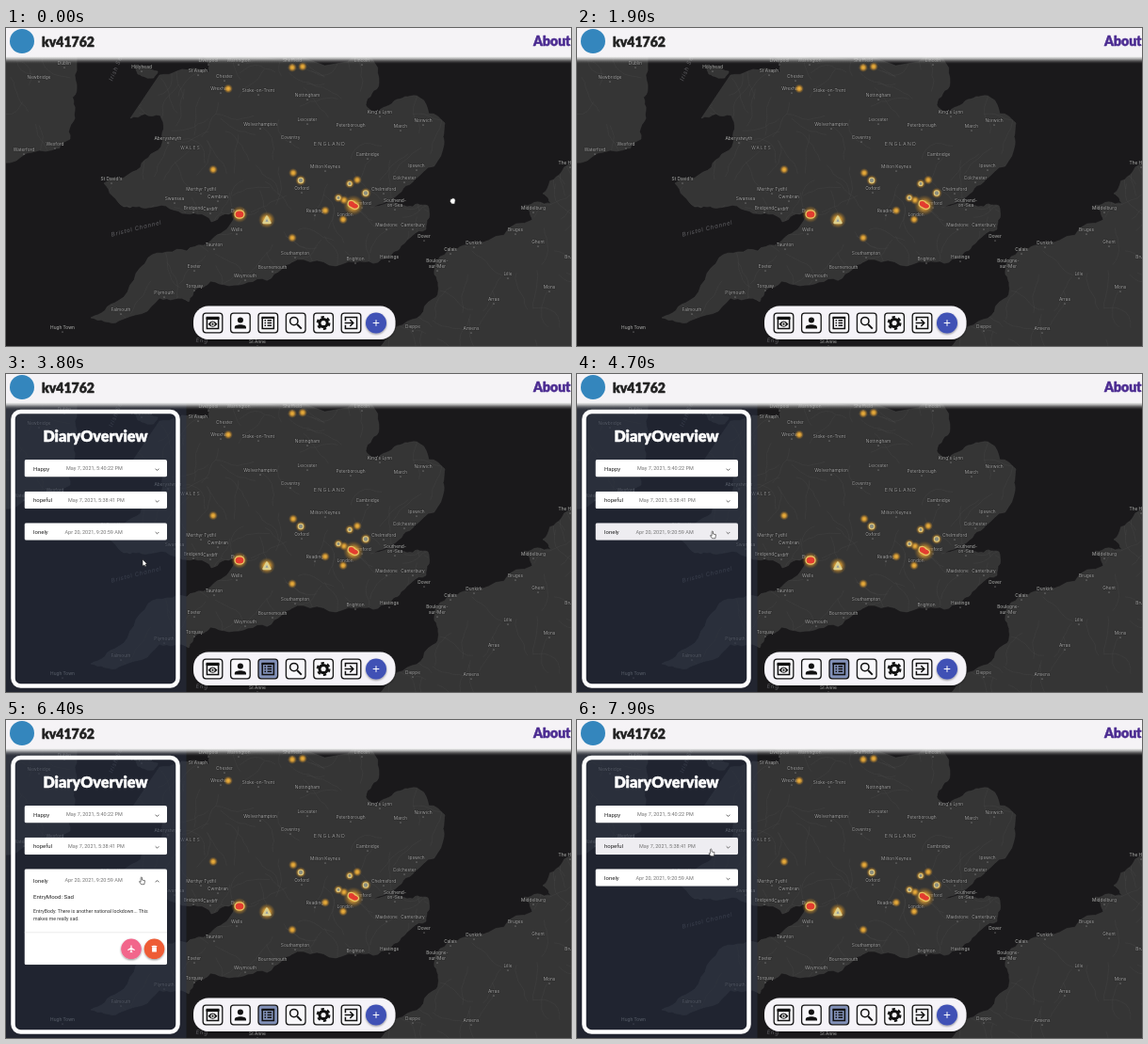
These frames come from a looping animation (600 by 338 pixels, 8 s). An HTML page:

```html
<!DOCTYPE html>
<html lang="en">
<head>
<meta charset="utf-8">
<title>Mood map</title>
<style>
html, body { margin: 0; width: 100%; height: 100%; overflow: hidden; background: #1a191b; }
#stage { display: block; width: 100vw; height: 100vh; }
text { font-family: Roboto, Arial, sans-serif; }
.round { font-family: Lato, "Open Sans", sans-serif; font-weight: 900; stroke-width: .5; stroke-linejoin: round; }
#labels text { font-family: Inter, Roboto, sans-serif; font-size: 4.8px; fill: #a9a9a9; text-anchor: middle; paint-order: stroke; stroke: #222; stroke-width: .7; }
#labels .region { font-size: 5.4px; letter-spacing: 1.2px; fill: #999; }
#labels .water { font-size: 6.2px; letter-spacing: .7px; fill: #606064; font-style: italic; stroke: none; }
.icon { fill: none; stroke: #111; stroke-width: 2; }
.icon .solid { fill: #111; stroke: none; }
</style>
</head>
<body>
<svg id="stage" viewBox="0 0 600 338" preserveAspectRatio="none">
  <defs>
    <radialGradient id="warm">
      <stop offset="0" stop-color="#f5b93d"/>
      <stop offset=".4" stop-color="#d99c34" stop-opacity=".9"/>
      <stop offset="1" stop-color="#8d6424" stop-opacity="0"/>
    </radialGradient>
    <linearGradient id="fade" x2="0" y2="1">
      <stop offset="0" stop-color="#fff"/>
      <stop offset=".35" stop-color="#ddd" stop-opacity=".75"/>
      <stop offset="1" stop-color="#555" stop-opacity="0"/>
    </linearGradient>
    <filter id="shadow" x="-30%" y="-30%" width="160%" height="180%">
      <feDropShadow dx="0" dy="1" stdDeviation="1" flood-opacity=".45"/>
    </filter>
    <path id="land"/>
    <clipPath id="coast"><use href="#land"/></clipPath>
  </defs>

  <use href="#land" fill="#353535" stroke="#404040" stroke-width=".5"/>
  <g clip-path="url(#coast)"><path id="roads" fill="none" stroke="#545454" stroke-width=".4" opacity=".5"/></g>
  <g id="labels"></g>
  <g id="heat"></g>

  <g id="panel">
    <path d="M0 30H191.5V338H0Z" fill="#2a3248" fill-opacity=".48"/>
    <rect x="7.5" y="40" width="175" height="291.5" rx="8" fill="#1b2132" fill-opacity=".25" stroke="#fff" stroke-width="4.5"/>
    <text class="round" x="95" y="72" font-size="16.2" text-anchor="middle" fill="#fff" stroke="#fff">DiaryOverview</text>
    <g id="rows"></g>
  </g>

  <rect y="30" width="600" height="8" fill="url(#fade)"/>
  <rect width="600" height="30" fill="#f5f3f6"/>
  <circle cx="17" cy="14" r="13" fill="#3486bd"/>
  <text class="round" x="38" y="19.5" font-size="14" fill="#222" stroke="#222">kv41762</text>
  <text class="round" x="560" y="18.5" font-size="14" fill="#4b2b91" stroke="#4b2b91">About</text>

  <rect x="199" y="295.5" width="214.5" height="35.5" rx="16" fill="#f5f3f8" filter="url(#shadow)"/>
  <g id="tools"></g>
  <circle cx="393" cy="313.5" r="11" fill="#3f51b5" filter="url(#shadow)"/>
  <path d="M389.7 313.5h6.6m-3.3-3.3v6.6" stroke="#fff"/>

  <g id="cursor" stroke="#222" stroke-width=".6" stroke-linejoin="round" fill="#fff">
    <path id="arrow" d="M-2-4V3L0 2 1 4 2 3 1 1H3Z"/>
    <path id="hand" d="M-1.4-3.5Q-.7-4.4 0-3.5V-1L3-.3 2.4 3.7H-1L-3 .7-1.4 .9Z"/>
    <path id="palm" d="M-2.5-2L-1-2.5 .3-3.2 2-2.5 2.7-1 2 3H-1.2L-3 .5Z"/>
  </g>
</svg>
<script>
const $ = id => document.getElementById(id);
const put = (id, markup) => $(id).insertAdjacentHTML('beforeend', markup);
const LOOP = 8000;
let seed = 17;
const rnd = () => (seed = seed * 16807 % 2147483647) / 2147483647;

// Roughens the line between two points by midpoint displacement
function rough([ax, ay], [bx, by], depth) {
  if (!depth) return `L${bx.toFixed(1)} ${by.toFixed(1)}`;
  const k = (rnd() - .5) * .3;
  const mid = [(ax + bx) / 2 + (ay - by) * k, (ay + by) / 2 + (bx - ax) * k];
  return rough([ax, ay], mid, depth - 1) + rough(mid, [bx, by], depth - 1);
}
let coast = '';
function addCoast(text) {
  const pts = text.trim().split(/\s+/).map(p => p.split(',').map(Number));
  coast += 'M' + pts[0] + pts.slice(1).map((p, i) => rough(pts[i], p, 3)).join('') + 'Z';
}
addCoast('-9,20 76,20 75,60 73,88 68,118 42,131 -9,145');
addCoast('136,39 161,46 157,53 140,49');
addCoast(`163,50 202,43 216,47 203,20 381,20 396,58 382,82 393,92 415,76 439,74 466,101
  465,124 434,161 411,181 387,191 426,190 448,189 446,214 420,231 408,244 371,249 316,246
  293,256 257,270 217,269 201,278 194,291 163,287 120,311 90,308 119,290 151,244 192,237
  224,220 243,196 218,206 187,197 151,191 125,190 104,165 143,148 166,122 164,93 132,96`);
addCoast(`392,345 426,312 457,286 455,262 461,243 496,230 559,204 550,188 579,187 570,176 590,153 608,140 608,345`);
$('land').setAttribute('d', coast);

// Faint road network
let roads = '';
for (let i = 0; i < 230; i++) {
  let x = rnd() * 600, y = 30 + rnd() * 308, a = rnd() * 6.28;
  roads += `M${x} ${y}`;
  for (let k = 0; k < 7; k++) {
    a += rnd() - .5;
    x += 6 * Math.cos(a);
    y += 6 * Math.sin(a);
    roads += `L${x.toFixed(1)} ${y.toFixed(1)}`;
  }
}
$('roads').setAttribute('d', roads);

function towns(text) {
  for (const item of text.split('|')) {
    const [, name, x, y] = item.trim().match(/^(.+) (\d+) (\d+)$/);
    put('labels', `<text x="${x}" y="${+y + 1.8}">${name}</text>
      <circle cx="${x}" cy="${+y + 5}" r=".6" fill="#aaa"/>`);
  }
}
const tilt = (text, x, y, turn) =>
  put('labels', `<text class="water" transform="translate(${x} ${y}) rotate(${turn})">${text}</text>`);
const region = (text, x, y, size) =>
  put('labels', `<text class="region" x="${x}" y="${y}" style="font-size:${size}px">${text}</text>`);

towns(`Dublin 62 37|Newbridge 35 52|Liverpool 215 34|Warrington 247 34|Sheffield 304 34|St Asaph 204 45
|Chester 232 51|Wrexham 228 64|Stoke-on-Trent 268 66|Nottingham 320 71|Holyhead 144 41|Lincoln 378 34|King's Lynn 397 89
|Norwich 443 98|March 419 104|Leicester 320 97|Peterborough 366 103|Wolverhampton 270 102|Coventry 302 116
|Cambridge 384 134|Aberystwyth 172 117|Waterford 19 129|Wexford 52 123|St David's 112 160|Milton Keynes 339 147`);
region('ENGLAND', 344, 125, 5.4);
region('WALES', 196, 129, 4.6);
towns(`Ipswich 436 146|Colchester 423 159|Merthyr Tydfil 207 171|Swansea 179 181|Cwmbran 225 179|Bridgend 199 191
|Cardiff 217 192|Bristol 246 194|Wells 245 214|Taunton 221 230|Oxford 314 170|Reading 328 194|London 360 198
|Chelmsford 401 171|Southend- 413 183|on-Sea 413 188|Romford 378 186|Maidstone 404 209|Canterbury 432 209|Dover 444 221
|Hastings 407 243|Brighton 371 245|Southampton 307 239`);
tilt('Bristol Channel', 139, 215, -14);
tilt('Irish Sea', 119, 42, -68);
tilt('Eng', 208, 334, 5);
towns(`Bournemouth 283 254|Exeter 200 253|Torquay 200 274|Weymouth 254 263|Plymouth 168 281|Falmouth 122 299|Hugh Town 60 318
|Calais 472 235|Dunkirk 497 228|Boulogne- 458 247|sur-Mer 458 253|Bruges 541 214|Ghent 565 227|Middelburg 560 191
|The Hague 599 143|Brussels 603 243|Lille 533 261|Mons 577 275|Arras 518 288|Amiens 494 319|Dieppe 432 317|St Anne 267 333`);

// Heat spots: soft dots, rings, hot cores
const dot = (x, y, r = 5) => `<circle cx="${x}" cy="${y}" r="${r}" fill="url(#warm)"/>`;
const ring = (x, y, r = 2.7) => dot(x, y, r + 3.2) +
  `<circle cx="${x}" cy="${y}" r="${r}" fill="#8c8f80" stroke="#dfc679" stroke-width="1.1"/>`;
const spots = [[304, 42], [315, 41], [236, 64.5], [220, 150.5], [305, 154], [373, 161.5], [359, 183], [339, 194], [358, 203.5], [304, 223]];
put('heat', spots.map(p => dot(...p)).join('') + ring(313, 162) + ring(365, 165.5, 2) + ring(382, 175.5) + ring(353, 180.5, 2) +
  dot(277, 204, 9) + `<path d="M277 200.5l3.5 6.5h-7z" fill="#8f9ba8" stroke="#ddd08e" stroke-width="2.4" stroke-linejoin="round"/>` +
  dot(248, 198, 9) + dot(369, 188.5, 11) +
  `<g fill="#e33c2f" stroke="#e8c765" stroke-width="1.3"><ellipse cx="248" cy="198" rx="5" ry="4.2"/>
   <path d="M364 184Q368 182 371 186 376 188 374 191 371 194 367 191 361 189 364 184Z"/></g>`);

// Toolbar
const sheet = '<path d="M4 4h16v16H4z"/><path d="M3 5h18"/>';
const icons = [
  sheet + '<path d="M3 6h18" stroke-width="3"/><path class="solid" d="M5.5 13.5q6.5-8 13 0-6.5 8-13 0"/><circle cx="12" cy="13.5" r="2.2" fill="#111" stroke="#fff" stroke-width="1.4"/>',
  '<circle class="solid" cx="12" cy="8" r="4"/><path class="solid" d="M4 20v-2c0-5 16-5 16 0v2z"/>',
  sheet + '<path d="M7 8.5h10m-10 3.5h10m-10 3.5h10" stroke-dasharray="2 2 6 0"/>',
  '<circle cx="9.5" cy="9.5" r="5.5"/><path d="M14 14l6 6" stroke-width="2.6"/>',
  '<circle cx="12" cy="12" r="5.4" stroke-width="4"/><circle cx="12" cy="12" r="8.2" stroke-width="3.2" stroke-dasharray="4.29"/>',
  '<path d="M4 9V4h16v16H4v-5M3 12h12M10.500 7.500l4.500 4.500-4.500 4.500"/>'
];
icons.forEach((art, i) => {
  const x = 219.5 + 29.4 * i, y = 313.5;
  put('tools', `<rect id="tool${i}" x="${x - 10.3}" y="${y - 10.3}" width="20.6" height="20.6" rx="3" fill="#f8f7fa" stroke="#151515" stroke-width="1.3"/>
    <g class="icon" transform="translate(${x} ${y}) scale(.76) translate(-12 -12)">${art}</g>`);
});

// Timeline rows
const button = (x, color, d) => `<circle cx="${x}" cy="85" r="10.8" fill="${color}" filter="url(#shadow)"/>
  <path transform="translate(${x} 85) scale(.4)" d="${d}" fill="#fff"/>`;
const plane = 'M-1.500-8q1.500-4 3 0v5l8 5v2l-8-2.500v5.500l2 1.500v1.500l-3.500-1-3.500 1v-1.500l2-1.500v-5.500l-8 2.500v-2l8-5z';
const bin = 'M-6-5h12v13h-12zM-7-8h3l1-1h6l1 1h3v2h-14z';
const details = `<g id="details">
  <text x="9.5" y="31.8" font-size="6.1" fill="#222">EntryMood: Sad</text>
  <g font-size="5.2" fill="#333"><text x="9.5" y="46.5">EntryBody: There is another national lockdown... This</text>
  <text x="9.5" y="54.5">makes me really sad.</text></g>
  <path d="M0 67.5h152" stroke="#e2e2e2" stroke-width=".7"/>
  ${button(113.5, '#f2668b', plane)}${button(138, '#ee5b36', bin)}</g>`;
[['Happy', 'May 7, 2021, 5:40:22 PM', 44.5], ['hopeful', 'May 7, 2021, 5:38:41 PM', 46.5],
 ['lonely', 'Apr 20, 2021, 9:20:59 AM', 43]].forEach(([mood, date, dx], i) => {
  put('rows', `<svg id="row${i}" x="19.5" y="${91 + 33.65 * i}" width="151.5" height="18.5" overflow="hidden">
    <rect id="face${i}" width="151.5" height="100%" rx="2" fill="#fff"/>
    <g id="head${i}"><text x="9.5" y="11.5" font-size="6" fill="#222">${mood}</text>
    <text x="${dx}" y="11.4" font-size="5.5" fill="#747474">${date}</text>
    <path id="chevron${i}" d="M-1.8-.8L0 1 1.8-.8" transform="translate(141 10.5)" fill="none" stroke="#555" stroke-width=".9"/></g>
    ${i === 2 ? details : ''}</svg>`);
});

const ease = (t, from, to) => {
  const p = Math.min(1, Math.max(0, (t - from) / (to - from)));
  return p * p * (3 - 2 * p);
};
// Cursor moves: start, end, x, y
const moves = [[400, 1600, 277, 316], [2700, 3600, 147, 201], [3950, 4500, 144.5, 171], [7150, 7600, 143, 141]];
const set = (id, key, value) => $(id).setAttribute(key, value);

function frame() {
  const t = performance.now() % LOOP;
  let x = 474.5, y = 184;
  for (const [from, to, mx, my] of moves) {
    const p = ease(t, from, to);
    x += (mx - x) * p;
    y += (my - y) * p;
  }
  set('cursor', 'transform', `translate(${x} ${y})`);

  const open = ease(t, 1950, 2150);
  set('panel', 'transform', `translate(${-192 * (1 - open)} 0)`);
  set('tool2', 'fill', t > 2000 ? '#8291b8' : '#f8f7fa');

  const grow = ease(t, 5000, 5300) - ease(t, 6750, 7050);
  set('row2', 'height', 18.5 + 83.5 * grow);
  set('head2', 'transform', `translate(0 ${2.7 * grow})`);
  set('chevron2', 'transform', `translate(141 10.5) rotate(${180 * grow})`);
  set('details', 'opacity', grow > 0 ? 1 : 0);

  const over = top => open === 1 && x > 19 && x < 171 && y > top && y < top + 18.5;
  const hover1 = over(124.7), hover2 = over(158.3);
  set('face1', 'fill', hover1 ? '#eeedf1' : '#fff');
  set('face2', 'fill', hover2 && grow < .5 ? '#eeedf1' : '#fff');

  const onTools = y > 295 && x > 199 && x < 413;
  const shape = onTools || hover1 || hover2 ? 'hand' : x > 191 ? 'palm' : 'arrow';
  for (const id of ['arrow', 'hand', 'palm']) set(id, 'visibility', id === shape ? 'visible' : 'hidden');
  // The pointer blends into the toolbar until the panel opens
  set('cursor', 'opacity', onTools && t < 1950 ? 0 : 1);
  requestAnimationFrame(frame);
}
frame();
</script>
</body>
</html>
```
